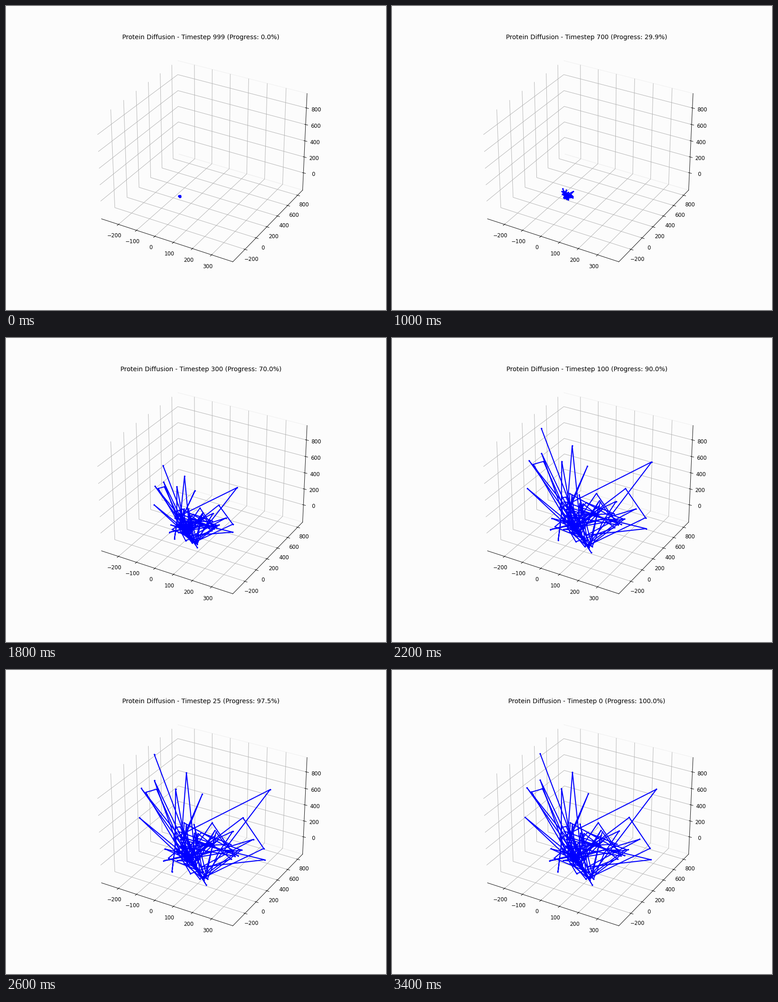
A matplotlib script that plays this animation: 837 px wide and 669 px high, repeating every 3600 ms.

```python
import numpy as np
import matplotlib.pyplot as plt
from matplotlib.animation import FuncAnimation

W, H, DPI = 837, 669, 83.7
BG = "#fcfcfc"
LAST = 999
STEPS = [LAST, 950, 900, 850, *range(800, 0, -100), 50, 25, 10, 5, 1, 0]
ORIGIN = np.array([381.9, 418.4])

# Outermost bends of the chain in stage pixels; each stroke returns to the core
STROKES = [
    [(326, 184)], [(397, 225)], [(432, 272)], [(297, 259)], [(326, 242)],
    [(293, 324)], [(307, 268), (331, 261)], [(373, 261)], [(365, 444)],
    [(582, 262)], [(568, 392), (522, 324)], [(545, 372)], [(570, 417)],
    [(441, 473)],
]

rng = np.random.default_rng(7)


def spine(count):
    """Crowded residues along the diagonal core."""
    along = rng.uniform(0, 1, (count, 1))
    return (np.array([374, 374]) + along * [66, 90]
            + rng.normal(0, 1, (count, 2)) * [10, 4])


def fan(count):
    """Looser residues in a wide arc above the core."""
    angle = np.radians(rng.uniform(-25, 205, count))
    reach = rng.uniform(0.35, 1, count)
    return np.column_stack([432 + 100 * reach * np.cos(angle),
                            405 - 78 * reach * np.sin(angle)])


def build_chain():
    parts = []
    for stroke in STROKES:
        parts += [stroke, spine(1)]
    filler = np.vstack([fan(40), spine(36)])
    return np.vstack(parts + [rng.permutation(filler)])


final = build_chain() - ORIGIN
bend = rng.normal(0, 5, final.shape) + [0, 33]
noise = rng.normal(0, 0.55, final.shape)


def signal(step):
    """Share of the final shape left after `step` steps of a linear schedule."""
    return np.exp(-0.5 * (1e-4 * step + 0.0199 * step**2 / 2000))


def chain_at(step):
    s = signal(step)
    return (ORIGIN + s * final + s * (1 - s) * bend
            + np.sqrt(1 - s * s) * noise)


fig = plt.figure(figsize=(W / DPI, 7.9929), dpi=DPI, facecolor=BG)
ax = fig.add_subplot(projection="3d", facecolor=BG)
ax.set_xticks(range(-200, 301, 100))
ax.set_yticks(range(-200, 801, 200))
ax.set_zticks(range(0, 801, 200))
ax.set_xlim(-295.5, 409.2)
ax.set_ylim(-411.7, 903.1)
ax.set_zlim(-220.9, 972.7)
for axis in (ax.xaxis, ax.yaxis, ax.zaxis):
    axis.pane.set_fill(False)
ax.xaxis.pane.set_edgecolor("none")

# Flat overlay measured in stage pixels
stage = fig.add_axes([0, 0, 1, 1])
stage.set_xlim(-0.5, W - 0.5)
stage.set_ylim(H - 0.5, -0.5)
stage.axis("off")
line, = stage.plot([], [], color="#0000ff", lw=1.9, marker="o", ms=2)


def draw(i):
    step = STEPS[i]
    line.set_data(*chain_at(step).T)
    progress = 100 * (LAST - step) / LAST
    title = ax.set_title(
        f"Protein Diffusion - Timestep {step} (Progress: {progress:.1f}%)")
    return line, title


anim = FuncAnimation(fig, draw, frames=len(STEPS), interval=200,
                     repeat=True, repeat_delay=0, blit=False)
plt.show()
```
